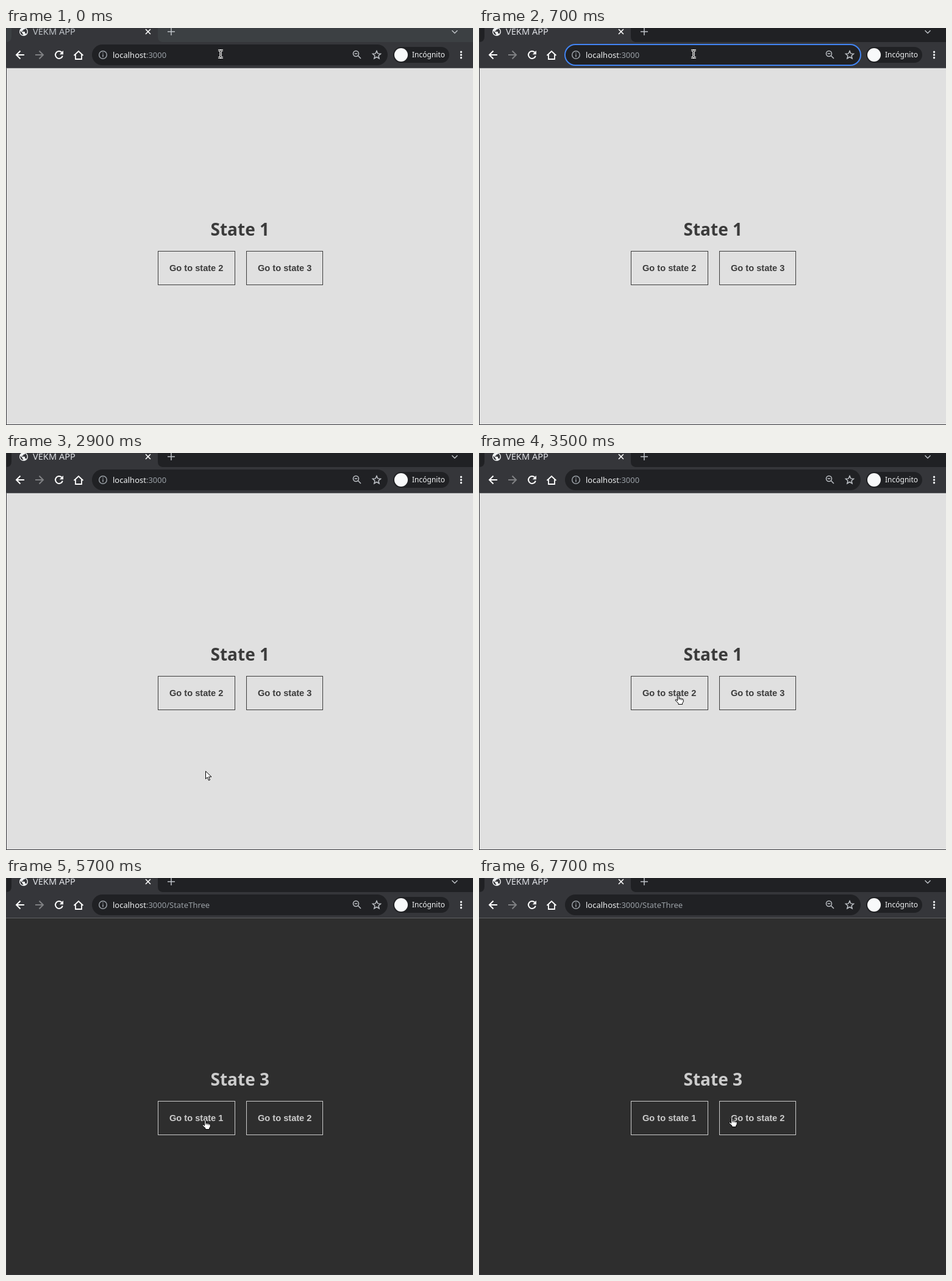
An HTML page for the animation above (8 s loop, 766 by 650 pixels).

```html
<!DOCTYPE html>
<html lang="en">
<head>
<meta charset="utf-8">
<title>State demo</title>
<style>
  html, body { margin: 0; width: 100%; height: 100%; overflow: hidden; background: #35363a; }
  svg { display: block; }
  text { font-family: "Noto Sans", "Open Sans", sans-serif; white-space: pre; }
  .line { fill: none; stroke: #fff; stroke-width: 2; }
  .soft { stroke: #bdc1c6; stroke-width: 1.5; }
  #heading { font-size: 28px; font-weight: 700; }
  .label { font: 700 14.6px "Liberation Sans", Arial, sans-serif; }
</style>
</head>
<body>
<svg width="766" height="650" viewBox="0 0 766 650">
  <defs>
    <path id="arrowLeft" d="M7 0H-6M.5-6.5L-6 0L.5 6.5"/>
    <path id="cross" d="M-5-5L5 5M5-5L-5 5"/>
  </defs>

  <!-- tab strip -->
  <rect id="strip" width="766" height="23"/>
  <path fill="#35363a" d="M0 23Q9 23 9 14V0H249V14Q249 23 258 23Z"/>
  <rect width="1" height="650" fill="#35363a"/>
  <path id="globe" transform="translate(20.6 -2.4) scale(.7)" fill="#f1f3f4" d="M12 2C6.48 2 2 6.48 2 12s4.48 10 10 10 10-4.48 10-10S17.52 2 12 2zm-1 17.93c-3.95-.49-7-3.85-7-7.93 0-.62.08-1.21.21-1.79L9 15v1c0 1.1.9 2 2 2v1.93zm6.9-2.54c-.26-.81-1-1.39-1.9-1.39h-1v-3c0-.55-.45-1-1-1H8v-2h2c.55 0 1-.45 1-1V7h2c1.1 0 2-.9 2-2v-.41c2.93 1.19 5 4.06 5 7.41 0 2.08-.8 3.97-2.1 5.39z"/>
  <path id="spinner" class="line" style="stroke:#8ab4f8" d="M29-1A7 7 0 0 1 36 6"/>
  <text id="tab" x="44" y="11" font-size="14.6">VEKM APP</text>
  <use href="#cross" class="line" transform="translate(233 6) scale(.8)"/>
  <path class="line soft" d="M265 6H277M271 0V12"/>
  <path class="line soft" d="M731.5 4L736 8.5L740.5 4"/>

  <!-- toolbar -->
  <rect y="23" width="766" height="43" fill="#35363a"/>
  <use href="#arrowLeft" class="line" x="23" y="44"/>
  <use href="#arrowLeft" class="line" style="stroke:#7f8083" transform="translate(55 44) scale(-1 1)"/>
  <g id="reload">
    <path class="line" d="M91.4 39.8A6 6 0 1 0 92.8 45.6"/>
    <path fill="#fff" d="M94 37V43.2H87.8Z"/>
  </g>
  <use id="stop" href="#cross" class="line" x="87" y="44"/>
  <path class="line" style="stroke-width:1.8" d="M111.5 45L119 38L126.5 45M114 43.5V51H124V43.5"/>

  <rect id="field" x="141" y="27" width="485" height="34" rx="17" fill="#202124"/>
  <g class="line soft" style="stroke:#9aa0a6">
    <circle cx="159" cy="44" r="6.3"/>
    <path d="M159 43V47.5M159 40.3V41.8"/>
  </g>
  <text x="175" y="49" font-size="13" fill="#f1f3f4">localhost<tspan id="path" fill="#9aa0a6"></tspan></text>
  <path id="caret" d="M262.5 35V53" stroke="#fff"/>
  <g class="line soft">
    <circle cx="574" cy="42" r="4.5"/>
    <path d="M577.3 45.3L582 50M571.8 42H576.2"/>
    <path d="M608 37.6L609.9 41.9L614.5 42.3L611 45.4L612.1 50L608 47.5L603.9 50L605 45.4L601.5 42.3L606.1 41.9Z"/>
  </g>
  <rect x="635" y="31" width="92" height="26" rx="13" fill="#202124"/>
  <circle cx="648" cy="44" r="11" fill="#f8f9fa"/>
  <text x="666" y="48" font-size="12" fill="#f1f3f4">Incógnito</text>
  <path d="M746.5 39.2V50" stroke="#f1f3f4" stroke-width="3.4" stroke-linecap="round" stroke-dasharray="0 4.8"/>

  <!-- page -->
  <rect y="65" width="766" height="1" fill="#606164"/>
  <rect id="page" x="1" y="66" width="765" height="583"/>
  <g id="ink">
    <text id="heading" x="335.5" y="340"></text>
    <g fill="none">
      <rect x="249.5" y="365.5" width="126" height="55"/>
      <rect x="394.5" y="365.5" width="125" height="55"/>
    </g>
    <text id="first" class="label" x="268" y="398" stroke="none"></text>
    <text id="second" class="label" x="413" y="398" stroke="none"></text>
  </g>

  <!-- pointers, each drawn from its top left corner -->
  <g id="beam" fill="none">
    <path id="beamShape" d="M1 1.5H3.5L5 3L6.5 1.5H9M5 3V12M1 13.5H3.5L5 12L6.5 13.5H9" stroke="#fff" stroke-width="3"/>
    <use href="#beamShape" style="stroke:#000"/>
    <path d="M1 1.5H3.5L5 3L6.5 1.5H9M5 3V12M1 13.5H3.5L5 12L6.5 13.5H9" stroke="#000"/>
  </g>
  <path id="arrow" fill="#fff" stroke="#000" d="M.5 1V13.6L3.4 10.9L5.5 16L7.6 15.1L5.5 10.2H10Z"/>
  <g id="hand">
    <path fill="#fff" stroke="#000" stroke-linejoin="round" d="M4.5 9.5V1.6Q5.7-.4 6.9 1.6V5.4Q8.2 4.5 9.3 5.9Q10.7 5.2 11.7 6.6Q13.6 6.1 14.2 8V11.2L12.6 13.5V15.5H6V13.6L1.2 9.2Q.8 7.3 2.7 7.8Z"/>
    <path stroke="#000" stroke-width=".8" d="M6.9 5V8M9.3 6V8.4M11.7 6.8V8.8"/>
  </g>
</svg>

<script>
const LOOP = 8000;
const $ = id => document.getElementById(id);

const states = [
  { from: 0, n: 1, path: ":3000", page: "#e0e0e0", ink: "#3b3b3b" },
  { from: 3900, n: 2, path: ":3000/StateTwo", page: "#525252", ink: "#ebebeb" },
  { from: 5700, n: 3, path: ":3000/StateThree", page: "#2e2e2e", ink: "#cccccc" }
];

const moves = [
  { from: 0, kind: "beam", x: 347, y: 35 },
  { from: 1900, kind: "arrow", x: 347, y: 7 },
  { from: 2900, kind: "arrow", x: 327, y: 520 },
  { from: 3100, kind: "arrow", x: 313, y: 458 },
  { from: 3300, kind: "hand", x: 312, y: 420 },
  { from: 3500, kind: "hand", x: 321, y: 396 },
  { from: 7100, kind: "hand", x: 324, y: 396 },
  { from: 7300, kind: "hand", x: 347, y: 394 },
  { from: 7500, kind: "hand", x: 382, y: 392 },
  { from: 7700, kind: "hand", x: 409, y: 392 }
];

const latest = (list, t) => list.filter(item => item.from <= t).pop();
const within = (t, a, b) => t >= a && t < b;
const show = (id, on) => $(id).setAttribute("visibility", on ? "visible" : "hidden");
const set = (id, name, value) => $(id).setAttribute(name, value);

function drawBrowser(t) {
  const active = t >= 600;
  const loading = within(t, 1500, 2000);
  set("strip", "fill", active ? "#202124" : "#3c4043");
  set("tab", "fill", active ? "#dfe1e5" : "#bdc1c6");
  set("field", "stroke", within(t, 600, 1500) ? "#4285f4" : "none");
  set("field", "stroke-width", 2);
  show("caret", within(t, 600, 700));
  show("globe", !loading);
  show("reload", !loading);
  show("stop", loading);
  show("spinner", loading && t >= 1600);
  set("spinner", "transform", `rotate(${Math.floor((t - 1600) / 100) * 75} 29 6)`);
}

function drawPage(t) {
  const s = latest(states, t);
  set("page", "fill", s.page);
  set("ink", "fill", s.ink);
  set("ink", "stroke", s.ink);
  set("heading", "stroke", "none");
  $("path").textContent = s.path;
  $("heading").textContent = `State ${s.n}`;
  $("first").textContent = `Go to state ${s.n % 3 + 1}`;
  $("second").textContent = `Go to state ${(s.n + 1) % 3 + 1}`;
}

function drawPointer(t) {
  const m = latest(moves, t);
  for (const kind of ["beam", "arrow", "hand"]) show(kind, kind === m.kind);
  set(m.kind, "transform", `translate(${m.x} ${m.y})`);
}

function draw(t) {
  drawBrowser(t);
  drawPage(t);
  drawPointer(t);
}

const start = performance.now();
function tick() {
  draw((performance.now() - start) % LOOP);
  requestAnimationFrame(tick);
}
tick();
</script>
</body>
</html>
```
